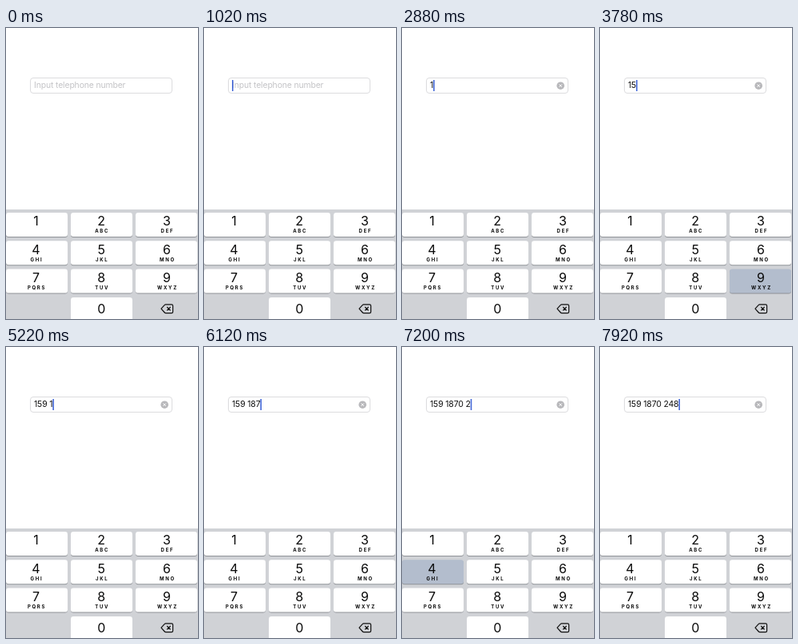
Recreate the animation shown at these times as an HTML page. Size 240 by 364 pixels, loop 8000 ms.

```html
<!DOCTYPE html>
<html lang="en">
<head>
<meta charset="utf-8">
<title>Telephone number input</title>
<style>
html, body { margin: 0; height: 100%; overflow: hidden; background: #fff; }
svg { display: block; width: 100vw; height: 100vh; font-family: Inter, "Liberation Sans", sans-serif; }
.field { font-size: 10.4px; letter-spacing: -.13px; fill: #111; }
.hint { fill: #c4c4c7; }
.digit { font-size: 16px; text-anchor: middle; fill: #0a0a0a; }
.letters { font-size: 6px; font-weight: 700; letter-spacing: 1.7px; text-anchor: middle; fill: #0a0a0a; }
</style>
</head>
<body>
<svg viewBox="0 0 240 364">
  <rect x="30.5" y="62.5" width="177" height="19" rx="3.5" fill="#fff" stroke="#dcdcde"/>
  <text id="hint" class="field hint" x="35" y="75">Input telephone number</text>
  <text id="number" class="field" x="35" y="75"></text>
  <rect id="caret" y="65" width="1.6" height="14" fill="#4468d8"/>
  <g id="clear">
    <circle cx="198.2" cy="72.2" r="4.8" fill="#b8b8bb"/>
    <path d="M196.5 70.5l3.4 3.4m0-3.4l-3.4 3.4" stroke="#fff"/>
  </g>
  <rect y="227" width="240" height="137" fill="#d0d2d6"/>
  <g id="keys"></g>
  <path d="M194 351.2l4.3-4.8q.5-.6 1.3-.6h7.4q1.6 0 1.6 1.6v7.6q0 1.6-1.6 1.6h-7.4q-.8 0-1.3-.6z
           M201.2 349l4.4 4.4m0-4.4l-4.4 4.4" fill="none" stroke="#111" stroke-width="1.2" stroke-linejoin="round"/>
</svg>
<script>
const LOOP = 8000, FADE = 120;
const letters = ['', 'ABC', 'DEF', 'GHI', 'JKL', 'MNO', 'PQRS', 'TUV', 'WXYZ'];

// key, touch down, touch up
const presses = [
  [1, 2640, 2820], [5, 3120, 3300], [9, 3720, 3900], [1, 5040, 5220], [8, 5400, 5520],
  [7, 5760, 5880], [0, 6360, 6480], [2, 6780, 6960], [4, 7200, 7320], [8, 7740, 7920]
];
// caret starts fading out, starts fading in
const blinks = [[-500, 60], [600, 900], [2160, 2460], [4260, 4740]];

const $ = id => document.getElementById(id);
const clamp = v => Math.max(0, Math.min(1, v));

function add(name, attrs, text = '') {
  const el = document.createElementNS('http://www.w3.org/2000/svg', name);
  for (const k in attrs) el.setAttribute(k, attrs[k]);
  el.textContent = text;
  return $('keys').appendChild(el);
}

function addKey(n) {
  const i = n ? n - 1 : 10;
  const col = i % 3, x = col * 81, y = 231 + Math.floor(i / 3) * 35.3;
  const mid = 37.5 + col * 81.7;
  const box = { x, y, width: 77, height: 30, rx: 3.2 };
  add('rect', { ...box, y: y + .9, fill: '#8f9297' });
  const face = add('rect', { ...box, fill: '#fff' });
  add('text', { class: 'digit', x: mid, y: Math.round(y + (n ? 16.3 : 20)) }, n);
  if (n) add('text', { class: 'letters', x: mid + 1, y: y + 25.4 }, letters[i]);
  return face;
}
const faces = Array.from({ length: 10 }, (_, n) => addKey(n));

function group(s) {
  return [s.slice(0, 3), s.slice(3, 7), s.slice(7)].filter(Boolean).join(' ');
}

function draw(t) {
  const typed = presses.filter(p => t >= p[2] - 60).map(p => p[0]).join('');
  const held = presses.find(p => t >= p[1] && t < p[2]);
  faces.forEach((f, n) => f.setAttribute('fill', held && held[0] === n ? '#b3bdcd' : '#fff'));

  $('number').textContent = group(typed);
  $('hint').style.display = typed ? 'none' : '';
  $('clear').style.display = typed ? '' : 'none';

  const hidden = blinks.reduce((sum, [out, back]) =>
    sum + clamp((t - out) / FADE) - clamp((t - back) / FADE), 0);
  $('caret').setAttribute('opacity', 1 - hidden);
  $('caret').setAttribute('x', 35 + (typed ? $('number').getComputedTextLength() : 0));
}

let start;
function tick(now) {
  start ??= now;
  draw((now - start) % LOOP);
  requestAnimationFrame(tick);
}
draw(0);
requestAnimationFrame(tick);
</script>
</body>
</html>
```
